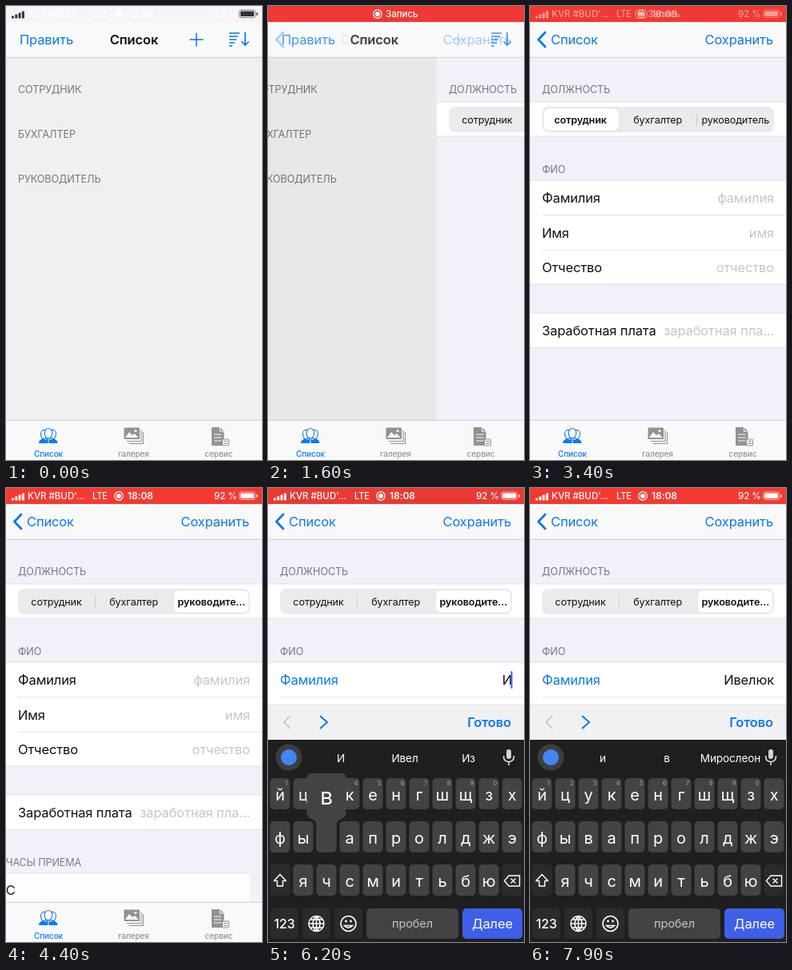
Write an HTML page that moves like this. It is 320 px wide and 568 px high and loops after 8000 ms.

```html
<!DOCTYPE html>
<html lang="ru">
<head>
<meta charset="utf-8">
<title>Форма</title>
<style>
  html, body { margin: 0; width: 100%; height: 100%; overflow: hidden; background: #f0f0f0; }
  svg { display: block; width: 320px; height: 568px; }
  text { font-family: Inter, "Noto Sans", sans-serif; letter-spacing: -0.008em; white-space: pre; }
</style>
</head>
<body>
<svg id="stage" viewBox="0 0 320 568" xmlns="http://www.w3.org/2000/svg"></svg>
<script>
const LOOP = 8000, STEP = 100;
const BLUE = '#0b7aea', GRAY = '#77777c', HINT = '#c6c6c9', TAB = '#929292', KEY = '#434343', DARK = '#2b2b2b';
const BOARD = '#1f1f1f', INK = '#111', FONT_SCALE = 0.97;

// Markup helpers
const text = (x, y, s, size, o = {}) =>
  `<text x="${x}" y="${y}" font-size="${size * FONT_SCALE}" fill="${o.fill || INK}" font-weight="${o.weight || 400}"` +
  ` text-anchor="${o.anchor || 'start'}"${o.id ? ` id="${o.id}"` : ''}>${s}</text>`;
const rect = (x, y, w, h, fill, r = 0, extra = '') =>
  `<rect x="${x}" y="${y}" width="${w}" height="${h}" rx="${r}" fill="${fill}" ${extra}/>`;
const line = (d, color, w = 1, extra = '') =>
  `<path d="${d}" fill="none" stroke="${color}" stroke-width="${w}" ${extra}/>`;
const group = (id, body, extra = '') => `<g id="${id}" ${extra}>${body}</g>`;
const mid = (x, y, s, size, o = {}) => text(x, y, s, size, { ...o, anchor: 'middle' });
const block = (y, h) => rect(0, y, 320, h, '#fff') +
  line(`M0 ${y}H320M0 ${y + h}H320`, '#d5d4da', 0.6);
const field = (y, name, hint, o = {}) =>
  text(15, y, name, 17, { id: o.label }) +
  text(305, y, hint, 17, { anchor: 'end', fill: HINT, id: o.value });

// Status bar
const signal = color => [0, 1, 2, 3].map(i =>
  rect(7 + i * 4.3, 12.5 - i * 2, 3, 3 + i * 2, color, 0.8)).join('');
const battery = color =>
  rect(291.5, 5, 20, 9.5, 'none', 2.5, `stroke="${color}" stroke-opacity=".6"`) +
  rect(293, 6.5, 17, 6.5, color, 1.3) + rect(313, 8, 1.5, 4, color, 0.7);
const recIcon = x =>
  `<circle cx="${x}" cy="10" r="5.3" fill="none" stroke="#fff" stroke-width="1.2"/><circle cx="${x}" cy="10" r="3" fill="#fff"/>`;
const white = { fill: '#fff', weight: 500 };
const info =
  text(27, 14.2, "KVR #BUD'...", 12, white) + text(108, 14.2, 'LTE', 11.5, white) + recIcon(141) +
  text(152, 14.2, '18:08', 12.5, { fill: '#fff', weight: 600 }) + text(260, 14.2, '92 %', 12, white);
const statusBar =
  rect(0, 0, 320, 20, '#f5f5f5') +
  group('idle', info + signal('#333') + battery('#333')) +
  rect(0, 0, 320, 20, '#f6392f', 0, 'id="red"') +
  group('recording', recIcon(137) + text(147, 14.2, 'Запись', 12, white)) +
  group('info', info + signal('#fff') + battery('#fff'));

// Navigation bar
const sortIcon = line('M279 34H292M279 38H290M279 42H288M279 46H286M279 50H283', BLUE, 1.7) +
  line('M299 33V49M294.5 44.5L299 49L303.5 44.5', BLUE, 1.7);
const navBar =
  rect(0, 20, 320, 44, '#f9f9f9') + line('M0 64.3H320', '#bdbdc0', 0.7) +
  group('listNav', text(17, 48, 'Править', 17, { fill: BLUE }) + sortIcon) +
  group('plus', line('M229.5 42H246.5M238 33.5V50.5', BLUE, 1.5)) +
  group('title', mid(160, 48, 'Список', 17, { weight: 600 })) +
  group('backLabel', text(26, 48, 'Список', 17, { fill: BLUE })) +
  group('formNav', line('M19 33L10.5 42L19 51', BLUE, 2.8, 'stroke-linecap="round" stroke-linejoin="round"') +
    text(304, 48, 'Сохранить', 17, { fill: BLUE, anchor: 'end' }));

// Tab bar
const person = (x, y, r) =>
  `<path d="M${x - r} ${y}a${r} ${r * 1.15} 0 0 1 ${r * 2} 0q-.3 4.5-2.5 6.5h${5 - r * 2}q-2.5-2-2.5-6.5z" fill="#fff" stroke="${BLUE}" stroke-width="1.1"/>`;
const tabBar =
  rect(0, 518, 320, 50, '#f9f9f9') + line('M0 518.4H320', '#bdbdc0', 0.7) +
  person(47.5, 535, 4) + person(58.5, 535, 4) + person(53, 534, 4.8) +
  `<path d="M41 547q0-5 6-5.5l2 1.5l3.5-2.5l4 2.5l2-1.5q6 .5 6 5.5z" fill="${BLUE}"/>` +
  line('M53 541v6', '#fff', 1) +
  line('M169 530.5v14h-18M171.5 533v14.5h-18', TAB, 1.1) +
  rect(147.5, 527.5, 19.5, 14.5, TAB, 1) +
  '<path d="M149 540l5-7l4 4l3-2l4.5 5z" fill="#f9f9f9"/><circle cx="162" cy="531.5" r="1.6" fill="#f9f9f9"/>' +
  `<path d="M257 527h10.5l5 5v18h-15.5z" fill="${TAB}"/>` +
  line('M267.5 527v5h5M260 536h9.5M260 540h9.5M260 544h9.5', '#f9f9f9', 1.1) +
  rect(270.5, 542, 8, 8, '#f9f9f9', 0.5, `stroke="${TAB}"`) +
  line('M272 544.5h5M272 547.5h5', TAB, 1) +
  mid(53, 564, 'Список', 10.3, { fill: BLUE, weight: 500 }) +
  mid(159.5, 564, 'галерея', 10.3, { fill: TAB, weight: 500 }) +
  mid(266, 564, 'сервис', 10.3, { fill: TAB, weight: 500 });

// Pages
const listPage = rect(0, 64, 320, 454, '#f0f0f0') +
  ['СОТРУДНИК', 'БУХГАЛТЕР', 'РУКОВОДИТЕЛЬ'].map((s, i) =>
    text(15, 109.3 + i * 55.6, s, 13, { fill: GRAY })).join('');

const roles = ['сотрудник', 'бухгалтер', 'руководитель'];
const segX = [63, 159.7, 256.8];
const segments = rect(15, 126, 290, 32, '#ebebed', 8) +
  line('M111.5 134V150', '#d0d0d4', 1, 'id="sep0"') + line('M208.5 134V150', '#d0d0d4', 1, 'id="sep1"') +
  rect(0, 128, 94, 28, '#fff', 7, 'id="thumb" stroke="#000" stroke-opacity=".05"') +
  roles.map((s, i) => mid(segX[i], 146.5, s, 13, { id: 'role' + i })).join('');

const personRows = text(15, 208.7, 'ФИО', 13, { fill: GRAY }) + block(218, 130) +
  line('M15 261.5H320M15 305H320', '#d5d4da', 0.6) +
  field(246, 'Фамилия', 'фамилия', { label: 'nameLabel', value: 'nameValue' }) +
  rect(303.5, 229, 2, 22, '#3d5fe0', 1, 'id="caret"') +
  field(289.5, 'Имя', 'имя') + field(333, 'Отчество', 'отчество') +
  block(384, 43.5) + field(411.5, 'Заработная плата', 'заработная пла...');
const hourRows = text(15, 473, 'ЧАСЫ ПРИЕМА', 13, { fill: GRAY }) + block(482, 44) + text(15, 509, 'С', 17);
const formPage = rect(0, 64, 320, 454, '#f2f1fa') +
  text(15, 109.3, 'ДОЛЖНОСТЬ', 13, { fill: GRAY }) + block(120, 43) + segments +
  group('personRows', personRows) + group('hourRows', hourRows);

// Keyboard
const keyRows = ['йцукенгшщзх', 'фывапролджэ', 'ячсмитьбю'];
const rowTop = r => 363 + r * 54;
const keyPos = {};
let keys = '';
keyRows.forEach((row, r) => [...row].forEach((ch, i) => {
  const x = 15 + 29 * (i + (r === 2 ? 1 : 0)), y = rowTop(r);
  keyPos[ch] = { x, y };
  keys += rect(x - 12.5, y, 25, 39, KEY, 5) +
    `<g class="letter" data-ch="${ch}">${mid(x, y + 28, ch, 20.6, { fill: '#fff' })}</g>`;
  if (r === 0 && i < 10) keys += mid(x + 8, y + 9, (i + 1) % 10, 8, { fill: '#a5a5a5' });
}));
const shiftPath = 'M15 483.5L22.5 491.5H18.5V498H11.5V491.5H7.5Z';
const special =
  rect(2.5, 471, 25, 39, DARK, 5) + `<path id="shift" d="${shiftPath}" stroke="#fff" stroke-width="1.4" stroke-linejoin="round"/>` +
  rect(292.5, 471, 25, 39, DARK, 5) +
  line('M301 485H314.5V498H301L295.5 491.5ZM303.5 488.5l6 6m0-6l-6 6', '#fff', 1.4) +
  [3, 43, 83].map(x => rect(x, 526, 35, 38, DARK, 5)).join('') +
  mid(20.5, 550.5, '123', 16.5, { fill: '#fff', weight: 500 }) +
  line('M51 545a9.5 9.5 0 1 0 19 0a9.5 9.5 0 1 0-19 0zM51 545h19M60.5 535.5v19M53 540h15M53 550h15M60.5 535.5q-9 9.5 0 19q9-9.5 0-19', '#fff', 1.5) +
  line('M91 545a9.5 9.5 0 1 0 19 0a9.5 9.5 0 1 0-19 0zM95.5 547.5q5 5.5 10 0z', '#fff', 1.7) +
  '<circle cx="97.5" cy="542" r="1.4" fill="#fff"/><circle cx="103.5" cy="542" r="1.4" fill="#fff"/>' +
  rect(123, 526, 115, 38, KEY, 5) + mid(180.5, 550, 'пробел', 15, { fill: '#c4c4c4' }) +
  group('enter', rect(244, 526, 26, 38, KEY, 5) + mid(257, 550, '.', 18, { fill: '#fff' }) +
    rect(275, 526, 43, 38, DARK, 5) + line('M306 540v6H287M292 541l-5 5l5 5', '#fff', 2)) +
  group('next', rect(243, 526, 75, 38, '#3f5fe9', 5) + mid(280.5, 550.5, 'Далее', 17, { fill: '#fff' }));
const tools = group('tools',
  rect(83, 327, 21, 21, '#c8c8c8', 2) +
  '<path d="M164 328h9v5h9v14h-18z" fill="#c8c8c8"/><circle cx="177" cy="331" r="4" fill="none" stroke="#c8c8c8" stroke-width="2"/>' +
  line('M180 334l3 3', '#c8c8c8', 2) + line('M168 341q4.5 5 9 0', BOARD, 1.5) +
  rect(242, 331, 21, 16, '#c8c8c8', 2) + rect(247, 328, 11, 4, '#c8c8c8', 1) +
  line('M252.5 339c-2-3-6-3-6 0s4 3 6 0s6-3 6 0s-4 3-6 0', BOARD, 1.3));
const mic = rect(298, 327, 6, 12, '#d5d5d5', 3) +
  line('M294.5 335q0 7.5 6.5 7.5t6.5-7.5M301 342.5v4.5', '#d5d5d5', 1.7);
const keyboard =
  rect(0, 271, 320, 44, '#f1f1f4') + line('M0 271.5H320', '#d5d5d9', 0.6) +
  line('M28 285l-8 8l8 8', '#c2c2c6', 1.7) + line('M65 285l9 8l-9 8', BLUE, 2) +
  text(304, 299, 'Готово', 17, { fill: BLUE, weight: 600, anchor: 'end' }) +
  rect(0, 315, 320, 260, BOARD) +
  '<circle cx="26" cy="337" r="16.5" fill="#3d3d3d"/><circle cx="26" cy="337" r="10" fill="#4285f4"/>' +
  tools + [91, 171, 250.5].map((x, i) => mid(x, 342.5, '', 14, { fill: '#fff', id: 'word' + i })).join('') +
  mic + keys + special +
  group('popup', `<path d="M-19.5-60h39a5 5 0 0 1 5 5v45q0 5-6 7q-6 2-6 7v30a5 5 0 0 1-5 5h-15a5 5 0 0 1-5-5v-30q0-5-6-7q-6-2-6-7v-45a5 5 0 0 1 5-5z" fill="${KEY}"/>` +
    mid(0, -21, '', 29, { fill: '#fff', id: 'popupChar' }));

document.getElementById('stage').innerHTML =
  group('list', listPage) + rect(0, 64, 320, 454, '#000', 0, 'id="dim"') + group('form', formPage) +
  navBar + tabBar + group('keyboard', keyboard) + statusBar;

// Motion
const el = id => document.getElementById(id);
const letters = [...document.querySelectorAll('.letter')];
const clamp = v => Math.min(1, Math.max(0, v));
const ramp = (t, from, length) => clamp((t - from) / length);
const bez = (a, b, u) => 3 * a * u * (1 - u) ** 2 + 3 * b * u * u * (1 - u) + u ** 3;
function ease(k) {
  let lo = 0, hi = 1;
  for (let i = 0; i < 22; i++) {
    const u = (lo + hi) / 2;
    if (bez(0.25, 0.25, u) < k) lo = u; else hi = u;
  }
  return bez(0.1, 1, lo);
}
const slide = (t, from, length) => ease(ramp(t, from, length));
const fade = (id, v) => el(id).setAttribute('opacity', v);
const show = (id, on) => el(id).setAttribute('display', on ? 'inline' : 'none');
const move = (id, x, y = 0) => el(id).setAttribute('transform', `translate(${x} ${y})`);
const set = (id, s) => { el(id).textContent = s; };

const picks = [2850, 3500, 4050];
const NAME = 'Ивелюк';
const typedAt = [5950, 6250, 6550, 6850, 7150, 7450];

function drawStatus(t) {
  const on = ramp(t, 0, 400), swap = ramp(t, 3200, 400);
  const dark = (1 - Math.cos((t - 650) / 3700 * 2 * Math.PI)) / 2;
  el('red').setAttribute('fill', `rgb(${246 - 12 * dark},57,${48 + 3 * dark})`);
  fade('red', on);
  fade('idle', 1 - on);
  fade('recording', on * (1 - swap));
  fade('info', swap);
}

function drawPush(t) {
  const p = slide(t, 1490, 500);
  move('list', -96 * p);
  fade('dim', 0.1 * p);
  move('form', 320 * (1 - p));
  fade('listNav', clamp(1.25 - 1.4 * p) * (p < 1));
  fade('plus', (t >= 1400 ? 0.3 : 1) * (1 - p));
  move('title', -80 * p);
  fade('title', clamp(1.25 - 1.3 * p) * (p < 1));
  move('backLabel', 98 * (1 - p));
  fade('backLabel', p * p);
  fade('formNav', p);
}

function drawForm(t) {
  const sel = picks.filter(at => t >= at).length - 1;
  const pos = slide(t, picks[1], 220) + slide(t, picks[2], 220);
  el('thumb').setAttribute('x', 17 + 96.3 * pos);
  fade('thumb', ramp(t, picks[0], 200));
  show('sep0', sel < 0 || sel > 1);
  show('sep1', sel < 1);
  roles.forEach((s, i) => {
    el('role' + i).setAttribute('font-weight', i === sel ? 600 : 400);
    set('role' + i, i === sel && i === 2 ? 'руководите...' : s);
  });
  const a = slide(t, 2900, 385), b = slide(t, 4120, 385);
  move('personRows', -320 * (1 - a));
  fade('personRows', a);
  move('hourRows', -320 * (1 - b));
  fade('hourRows', b);
}

function drawTyping(t) {
  const n = typedAt.filter(at => t >= at).length;
  const typed = NAME.slice(0, n), focused = t >= 5150, done = t >= 7600;
  move('keyboard', 0, 300 * (1 - slide(t, 5180, 400)));
  el('nameLabel').setAttribute('fill', focused ? BLUE : INK);
  set('nameValue', typed || 'фамилия');
  el('nameValue').setAttribute('fill', n ? INK : HINT);
  show('caret', focused && t < 7800);

  const upper = n === 0;
  letters.forEach(g => {
    const ch = g.dataset.ch;
    g.firstChild.textContent = upper ? ch.toUpperCase() : ch;
  });
  el('shift').setAttribute('fill', upper ? '#fff' : 'none');
  show('tools', !n);
  show('enter', !n);
  show('next', n);
  const words = !n ? ['', '', ''] : done ? ['и', 'в', 'Мирослеон'] : [typed, n < 4 ? 'Ивел' : NAME, 'Из'];
  words.forEach((w, i) => set('word' + i, w));

  const hit = typedAt.findIndex(at => t >= at - 100 && t < at);
  show('popup', hit >= 0);
  if (hit >= 0) {
    const ch = NAME[hit].toLowerCase(), { x, y } = keyPos[ch];
    move('popup', x, y);
    set('popupChar', upper ? ch.toUpperCase() : ch);
  }
}

function frame() {
  const t = Math.floor(performance.now() % LOOP / STEP) * STEP;
  drawStatus(t);
  drawPush(t);
  drawForm(t);
  drawTyping(t);
  requestAnimationFrame(frame);
}
frame();
</script>
</body>
</html>
```
